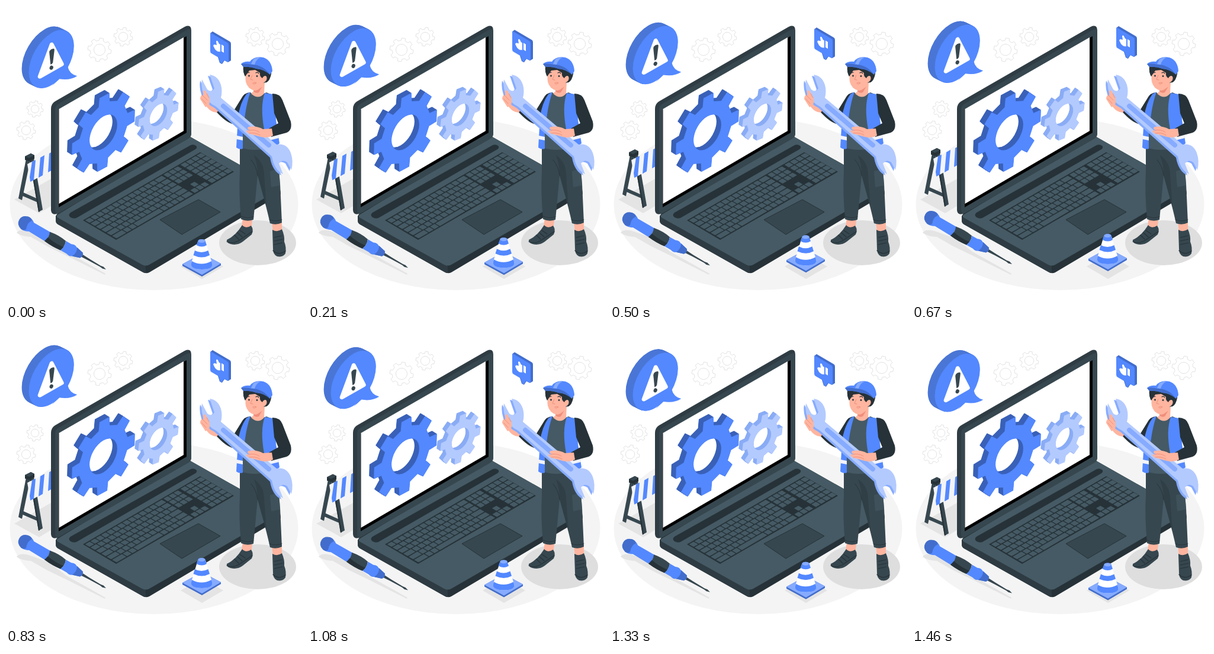
An HTML page that plays this animation: 500 by 500 pixels, repeating every 1500 ms.

```html
<!DOCTYPE html>
<html lang="en">
<head>
<meta charset="utf-8">
<title>Laptop repair</title>
<style>
  html, body { margin: 0; width: 100%; height: 100%; overflow: hidden; background: #fff; }
  svg { display: block; width: 100%; height: 100%; }
  .blue { fill: #5388ff; } .navy { fill: #426dcc; } .light { fill: #86abff; } .pale { fill: #b3caff; }
  .ink { fill: #263238; } .slate { fill: #37474f; } .steel { fill: #455a64; }
  .white { fill: #fff; } .shade { fill: #e4e4e4; } .skin { fill: #ffb59f; }
  .line { fill: none; stroke: #263238; stroke-linecap: round; stroke-linejoin: round; }
  .crease { stroke: #e98775; stroke-width: .8; }
</style>
</head>
<body>
<svg viewBox="0 0 500 500">
  <ellipse cx="250" cy="335" rx="243.5" ry="145" fill="#f4f4f4"/>
  <g id="outlines" fill="none" stroke="#e3e3e3"/>

  <!-- floor shadows -->
  <path class="shade" d="M14 327L76 292V338L56 350Z"/>
  <path class="shade" d="M18 383Q23 376 38 380L72 392L102 415L168 452L167 454L105 423L70 406L42 390Q25 389 18 383Z"/>
  <path class="shade" d="M295 440L331 419L367 440L331 461Z"/>
  <ellipse cx="425" cy="400" rx="65" ry="38" fill="#dedede"/>

  <!-- barrier -->
  <g class="float">
    <path class="slate" d="M34 258L41 260L27 328L21 325Z"/>
    <path class="slate" d="M27 314L54 326V332L26 320Z"/>
    <path class="slate" d="M40 260L47 257L62 344L55 348Z"/>
    <path class="ink" d="M40 260L42 259L57 347L55 348Z"/>
    <path class="ink" d="M32 254L42 249L48 252V258L39 262L32 260Z"/>
    <path class="slate" d="M32 254L42 249L48 252L39 257Z"/>
    <path fill="#f3f4f8" d="M36 267L80 245V276L41 297Z"/>
    <path class="blue" d="M44 263L50 260L47 294L41 297L40 289ZM58 256L65 252L62 286L55 290ZM73 249L80 245V276L71 281Z"/>
  </g>

  <!-- laptop -->
  <path class="ink" d="M84 362V355Q86 350 98 340L306 217L313 222L458 304Q464 308 464 318L242 450Q236 453 230 449L88 369Q84 367 84 362Z"/>
  <path fill="#2e3b42" d="M84 356L236 438V451Q233 451 230 449L88 369Q84 367 84 362Z"/>
  <path class="steel" d="M88 352L306 220L313 222L458 304Q464 309 457 313L242 437Q236 440 230 437L88 358Q83 355 88 352Z"/>
  <path fill="#2f3c43" d="M76 174Q76 165 83 161L302 35Q313 30 313 42V215Q313 221 308 224L89 350Q77 355 76 345Z"/>
  <path class="slate" d="M83 174Q83 168 89 165L304 41Q311 37 313 42V215Q313 221 308 224L89 350Q83 352 83 345Z"/>
  <path d="M89 175L305 51V214L89 340Z"/>
  <path class="white" d="M89.500 174L300 53V211L89.500 334Z"/>
  <path class="ink" d="M109 349L312 235Q317 233 321 236Q324 239 320 242L119 358Q114 360 109 357Q104 353 109 349Z"/>
  <path class="ink" d="M130 362L328 247L385 280L186 395Z"/>
  <g id="keys" class="steel" transform="matrix(.9 -.523 .866 .5 130 362)"/>
  <path class="slate" stroke="#263238" d="M260 361L325 327L362 348L297 386Z"/>
  <g id="gears"></g>

  <!-- alert bubble -->
  <g class="float"><g transform="translate(-.8 1.200)">
    <g id="bubble"></g>
    <path class="blue" d="M105 101Q108 114 121 117Q109 125 91 122L78 134Z"/>
    <path class="white" stroke="#fff" stroke-width="7" stroke-linejoin="round" d="M78 64L58 118L95 97Z"/>
    <path class="slate" d="M74 77Q74 74 77 72L80 71Q83 70 82.500 74L80 94Q79 97 76 97.500Z"/>
    <ellipse class="slate" cx="77.500" cy="103" rx="3" ry="3.600" transform="rotate(25 77.500 103)"/>
  </g></g>

  <!-- approval bubble -->
  <g class="float">
    <path class="navy" d="M345 46L349 43L378 60Q380 61 380 64V92L375 95L369 92L365 98L361 96Z"/>
    <path class="blue" d="M347 46L374 62Q376 63 376 66V93Q376 96 373 94L368 91.500L364 98Q361 95 359 87L347 80Q345 79 345 76V48Q345 45 347 46Z"/>
    <path class="white" d="M364 65L368 67.500V79L364 76.500ZM362 65V77Q357 78 353 73L351 69Q349 66 352 65L356 66L355 60Q356 57 358 60L360 64Z"/>
  </g>

  <!-- screwdriver -->
  <g class="float"><g transform="translate(31 366) rotate(29.800)">
    <path class="slate" d="M108-2.500L126-1.500L148-1L153-1.800L159 0L153 1.800L148 1L126 1.500L108 2.500Z"/>
    <path class="blue" d="M0-12Q8-13 14-8L47-8V10L14 9Q8 13 0 12Z"/>
    <path class="navy" d="M0-12Q8-13 9-9Q4-3 8 8Q6 13 0 12Q-10 9-10 0T0-12Z"/>
    <path class="slate" d="M45-8Q62-11 76-8Q80 1 76 10Q62 12 45 10Q49 0 45-8Z"/>
    <path class="ink" d="M47 2Q64 5 78 3L76 10Q62 12 45 10Z"/>
    <path class="blue" d="M76-8L87-8Q93-11 97-8L111-5Q115 0 111 5L98 9Q94 12 88 10L76 10Q80 1 76-8Z"/>
    <path class="navy" d="M98-8L111-5Q115 0 111 5L98 9Q103 0 98-8Z"/>
  </g></g>

  <!-- traffic cone -->
  <g class="float">
    <path class="navy" d="M298 436L331 418L363 435V438L331 457L298 439Z"/>
    <path class="light" d="M298 436L331 418L363 435L331 454Z"/>
    <path class="white" d="M324 398L337 398L348.500 436Q348 445 331 445T312.500 436Z"/>
    <path class="blue" d="M324 398Q324 394 330.500 394T337 398L339 404Q331 409 321.700 404ZM319 413Q330 419 341.500 413L344 421Q331 428 316.500 421ZM314 431Q330 440 347 431L348.500 436Q349 445 331 445T312.500 436Z"/>
    <ellipse class="light" cx="330.500" cy="397" rx="6" ry="3"/>
  </g>

  <!-- worker -->
  <g>
    <path class="skin" d="M400 355H417L414 378L398 376ZM449 365H466V382L451 381Z"/>
    <path class="slate" d="M399 370Q405 377 414 371Q419 378 415 386L400 398Q391 405 379 402Q372 400 373 395Q388 388 399 370ZM450 378Q458 383 466 377Q471 388 470 398Q474 408 472 418Q468 425 458 423Q451 420 451 410Z"/>
    <path class="line" stroke-width="1.200" d="M373 398Q382 402 392 397L416 381M391 383L399 390M395 379L404 385M386 387L393 394M451 413Q460 422 472 414M453 391L466 388M453 397L467 394M453 403L467 400"/>
    <path class="slate" d="M395 230L455 226Q459 255 463 300L466 366Q456 371 446 367Q439 335 425 286L418 361Q407 365 397 360Q393 315 395 280Z"/>
    <path class="ink" opacity=".4" d="M425 286Q425 266 419 252Q436 264 436 286L440 340Q432 312 425 286Z"/>
    <path class="steel" opacity=".6" d="M446 279L461 275L463 303L448 306Z"/>
    <path class="line" stroke-width=".8" d="M397 355Q407 360 418 356M445 361Q456 365 466 361M425 286Q423 270 414 260"/>
    <path class="ink" d="M413 146Q402 146 397 157L384 178L361 162L351 174Q369 195 382 199Q391 199 396 190L410 170Z"/>
    <path class="steel" d="M412 146Q426 153 440 146L452 151L455 234Q427 249 396 239L397 185Z"/>
    <path class="blue" d="M413 145L406 149Q395 164 392 188L389 239Q394 243 400 241V211L404 183Q407 162 413 145ZM437 147L451 149Q456 176 456 192L462 232Q454 240 443 240L436 208Q429 170 437 147Z"/>
    <path fill="#f2f4fa" d="M390 219L400 221V227L389.500 225ZM440 221L460 217L461 223L441 228Z"/>
    <path class="skin" d="M418 129H437L436 148Q426 159 414 148L418 144Z"/>
    <path fill="#f08f7c" d="M418 140Q427 142 433 136L427 146Q421 148 418 144Z"/>
    <path class="ink" d="M401 102L442 98Q451 108 447 119Q443 132 434 129L424 116L408 112L404 119Q400 112 401 102Z"/>
    <path class="skin" d="M408 109Q424 105 431 112L432 121Q437 115 440 119Q443 126 434 130Q429 143 420 143Q408 140 405 128Q403 117 408 109Z"/>
    <path class="ink" d="M401 101L444 103L441 119Q436 116 433 122Q428 119 429 113L421 108L411 109L404 119Q400 112 401 101Z"/>
    <path class="blue" d="M397 98Q402 93 412 94Q419 84 435 87Q449 92 450 110L446 116Q436 106 423 106Q411 102 401 103Z"/>
    <path class="navy" d="M397 98Q405 96 415 99Q434 99 446 116Q435 107 423 106Q411 102 401 103Z"/>
    <path class="light" d="M418 90Q424 86 431 86.500Q422 90 420 99L414 98Z"/>
    <path class="line" stroke-width="1.200" d="M408 113L411 112M422 113Q425 111 427 114"/>
    <circle class="ink" cx="410.500" cy="118" r="1.400"/><circle class="ink" cx="424" cy="118.500" r="1.400"/>
    <path class="line crease" d="M416 117L413 124L417 125M417 130Q420 128 423 130L419 132Z"/>
    <path class="skin" d="M338 169Q330 163 330 150L334 146L348 155L362 172L356 180Q346 180 338 169Z"/>

    <!-- wrench -->
    <defs><path id="wrench" d="M344 116Q358 118 363 133Q366 144 363 155L457 234Q474 231 481 248Q486 262 482 277L475 264Q467 258 461 266L468 284Q453 277 449 254L355 170Q340 163 333 147Q329 135 331 124L340 141Q347 147 352 139Z"/></defs>
    <use href="#wrench" class="light" x="-3" y="2"/>
    <use href="#wrench" class="pale"/>
    <path d="M367 169L444 235" stroke="#86abff" stroke-width="8" stroke-linecap="round"/>

    <path class="skin" d="M333 143Q337 141 339 147L343 154Q345 161 343 167L337 171L328 157Q328 150 333 151Z"/>
    <path class="line crease" d="M332 151L340 159M331 157L338 165M339 148L343 155"/>
    <path class="ink" d="M450 148Q463 148 467 159L481 195Q484 210 474 214L448 221L444 207L460 198L453 181Z"/>
    <path class="skin" d="M449 207L434 208Q424 202 410 204Q405 207 412 210L407 210Q404 213 412 216L430 221Q441 224 451 219Z"/>
    <path class="line crease" d="M411 210Q420 208 428 213M411 215Q421 213 429 218"/>
  </g>
</svg>
<script>
const byId = id => document.getElementById(id);
const LOOP = 1500, LIFT = 10;

// Gear with eight tapered teeth and a round hole, centred on the origin
function gearPath(outer, inner, hole, turn) {
  const points = [];
  for (let tooth = 0; tooth < 8; tooth++) {
    for (const [offset, r] of [[-13, inner], [-9, outer], [9, outer], [13, inner]]) {
      const a = (turn + tooth * 45 + offset) * Math.PI / 180;
      points.push((r * Math.cos(a)).toFixed(2) + ' ' + (r * Math.sin(a)).toFixed(2));
    }
  }
  return `M${points.join('L')}ZM${hole} 0A${hole} ${hole} 0 1 0 ${-hole} 0A${hole} ${hole} 0 1 0 ${hole} 0Z`;
}

// Stack copies of an upright isometric shape from back to front
function extrude(d, x, y, dx, dy, side, face) {
  let out = '';
  for (let i = 20; i >= 0; i--) {
    const k = i / 20;
    out += `<path d="${d}" fill="${i ? side : face}" fill-rule="evenodd" transform="matrix(.866 -.5 0 1 ${x + dx * k} ${y + dy * k})"/>`;
  }
  return out;
}

byId('outlines').innerHTML = [
  [158, 74, 20], [198, 52, 16], [421, 52, 16], [459, 64, 20], [49, 174, 14], [34, 210, 16]
].map(([x, y, r]) =>
  `<path transform="translate(${x} ${y})" d="${gearPath(r, r * .8, r * .48, 10)}"/>`).join('');

byId('gears').innerHTML =
  extrude(gearPath(39.5, 30, 17, 8), 257.5, 184, -6, -4, '#8aacf5', '#b3caff') +
  extrude(gearPath(62, 48, 27, 2), 164.5, 213.5, -8, -5, '#3a61b8', '#5388ff');

byId('bubble').innerHTML =
  extrude('M44 0A44 44 0 1 1-44 0A44 44 0 1 1 44 0Z', 77.5, 88.5, -12, -6, '#4a76d6', '#5388ff');

const key = (x, y, w, h = 8.8) => `<rect x="${x}" y="${y}" width="${w}" height="${h}" rx="1"/>`;
let keys = '';
for (let row = 0; row < 6; row++) {
  const y = 2 + row * 10.5;
  let x = 2;
  for (let n = 0; x < 145; n++) {
    let w = n ? 8.6 : 8.6 + row * 2;
    if (row === 5 && n === 3) w = 48;
    if (x + w > 136) w = 146 - x;
    keys += key(x, y, w);
    x += w + 1.4;
  }
  for (let n = 0; n < 3; n++) {
    if (row < 3 || row === 5 || (row === 4 && n === 1)) keys += key(149 + n * 9.5, y, 8.1);
  }
  for (let n = 0; n < 4; n++) keys += key(181 + n * 10, y, 8.6);
}
byId('keys').innerHTML = keys;

const floating = document.querySelectorAll('.float');
function draw() {
  const phase = performance.now() % LOOP / LOOP;
  const y = -LIFT * (1 - Math.abs(1 - 2 * phase));
  floating.forEach(el => el.setAttribute('transform', `translate(0 ${y.toFixed(3)})`));
  requestAnimationFrame(draw);
}
draw();
</script>
</body>
</html>
```
